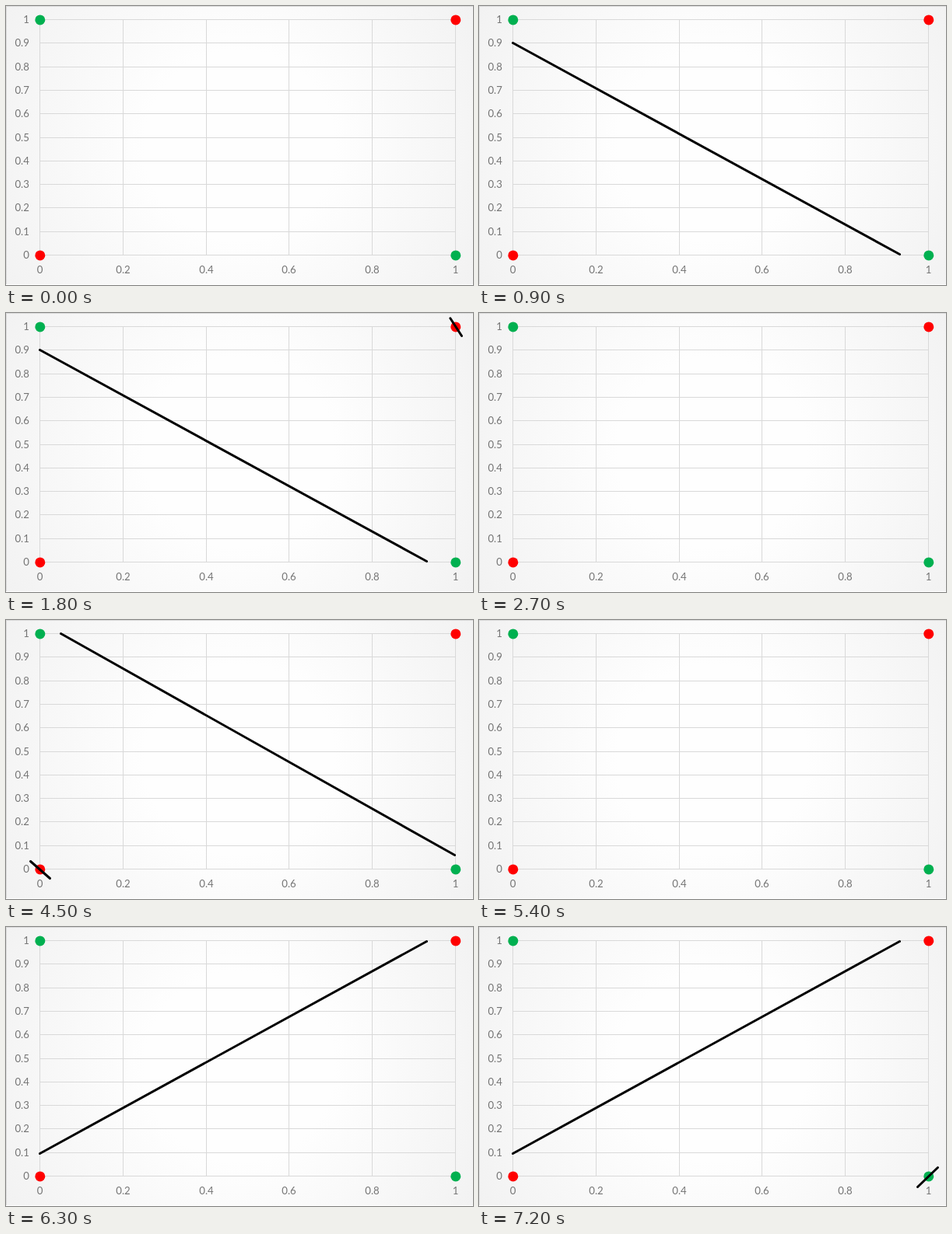
An HTML page for the animation above (8 s loop, 600x359 px).

```html
<!DOCTYPE html>
<html lang="en">
<head>
<meta charset="utf-8">
<title>Separating lines</title>
<style>
  html, body { margin: 0; width: 100%; height: 100%; overflow: hidden; background: #fff; }
  svg { display: block; width: 600px; height: 359px; }
  text { font: 13.2px Lato, sans-serif; fill: #747474; }
  .frame, .grid { fill: none; stroke: #d9d9d9; shape-rendering: crispEdges; }
  .stroke { stroke: #000; stroke-width: 3; stroke-linecap: round; }
</style>
</head>
<body>
<svg id="chart" viewBox="0 0 600 359">
  <defs>
    <radialGradient id="glow" gradientUnits="userSpaceOnUse" cx="300" cy="179" r="349">
      <stop offset=".35" stop-color="#fefefe"/>
      <stop offset="1" stop-color="#f2f2f2"/>
    </radialGradient>
  </defs>
  <rect width="600" height="358" fill="url(#glow)"/>
  <path class="frame" d="M.5 358V.5H600"/>
</svg>
<script>
const chart = document.getElementById('chart');
const LEFT = 43, RIGHT = 577, TOP = 17, BOTTOM = 320;
const STEP = 900, LOOP = 8000;

function add(tag, attrs, text = '') {
  const node = document.createElementNS('http://www.w3.org/2000/svg', tag);
  for (const key in attrs) node.setAttribute(key, attrs[key]);
  node.textContent = text;
  chart.append(node);
  return node;
}

const line = (cls, x1, y1, x2, y2) => add('line', { class: cls, x1, y1, x2, y2 });
const label = (value, x, y, anchor) =>
  add('text', { x, y, 'text-anchor': anchor }, +value.toFixed(1));

for (let i = 0; i <= 10; i++) {
  const y = Math.round(BOTTOM - i * (BOTTOM - TOP) / 10) + .5;
  line('grid', LEFT, y, RIGHT + 1, y);
  label(i / 10, 29.8, y + 4.5, 'end');
}
for (let i = 0; i <= 5; i++) {
  const x = Math.round(LEFT + i * (RIGHT - LEFT) / 5) + .5;
  line('grid', x, TOP, x, BOTTOM + 1);
  label(i / 5, x, 344, 'middle');
}

for (const x of [LEFT, RIGHT])
  for (const y of [TOP, BOTTOM])
    add('circle', {
      cx: x + .8, cy: y + .9, r: 6.5,
      fill: (x === LEFT) === (y === TOP) ? '#00b050' : '#f00'
    });

// Each phase: empty chart, then a separating line, then a strike through the misclassified point.
const phases = [
  [[43.5, 47.5, 540.5, 319.5], [570.8, 6.8, 585.5, 29.5]],
  [[70.5, 17.5, 576.5, 302.5], [31.5, 310.5, 56.5, 332.5]],
  [[43.5, 291.5, 540.5, 18.5], [563.5, 334.5, 589.5, 309.5]]
].map(pair => pair.map(ends => line('stroke', ...ends)));

function draw() {
  const step = Math.floor(performance.now() % LOOP / STEP);
  phases.forEach((pair, p) => pair.forEach((stroke, s) => {
    const visible = Math.floor(step / 3) === p && step % 3 > s;
    stroke.setAttribute('visibility', visible ? 'visible' : 'hidden');
  }));
  requestAnimationFrame(draw);
}
draw();
</script>
</body>
</html>
```
